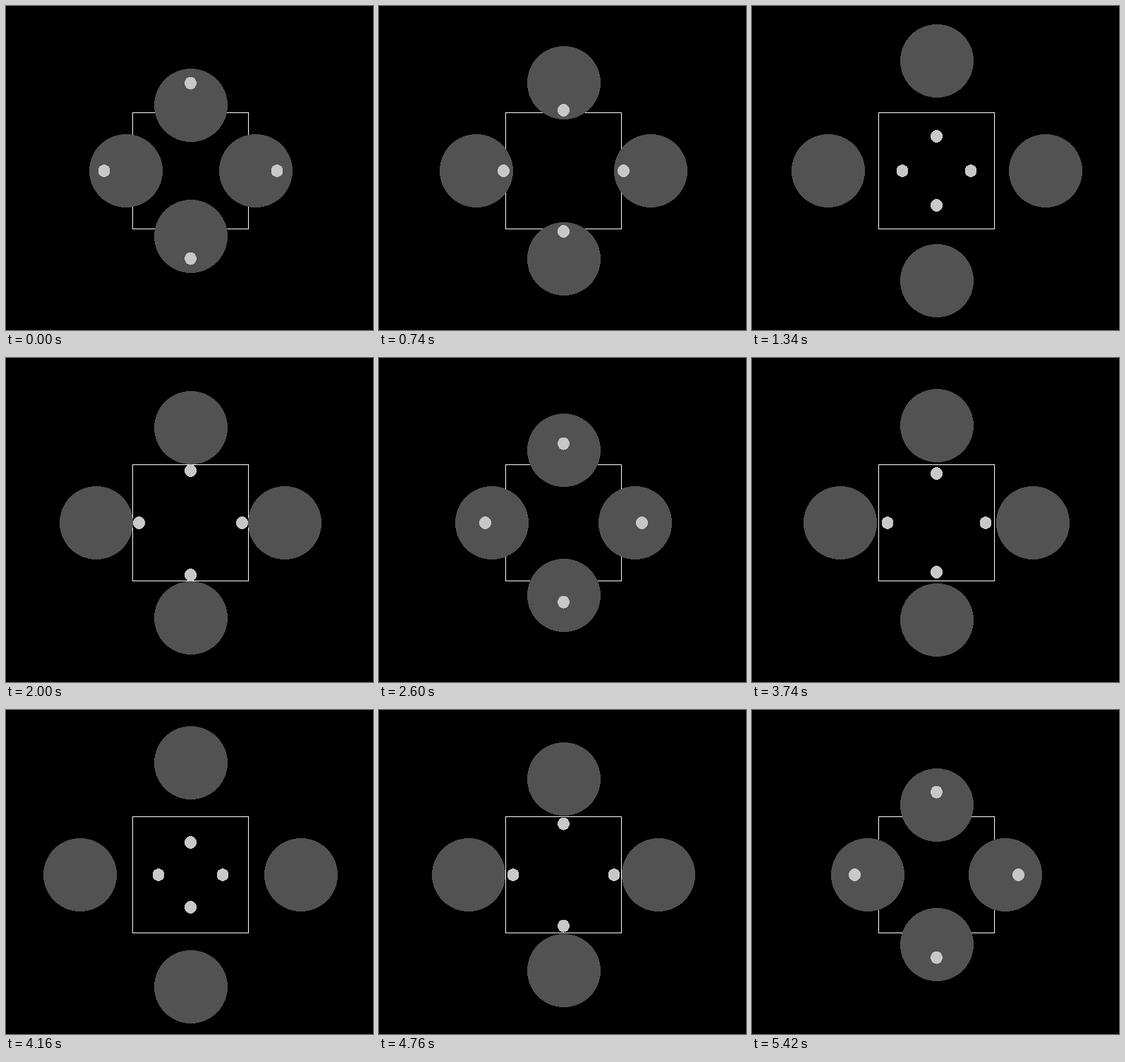
Animation of 520 by 460 pixels, one loop 5480 ms. Source, as an HTML page:

```html
<!DOCTYPE html>
<html>
<head>
<meta charset="utf-8">
<style>
  html, body { margin: 0; height: 100%; overflow: hidden; background: #000; }
  svg { display: block; }
</style>
</head>
<body>
<svg id="stage" width="520" height="460" viewBox="0 0 520 460" shape-rendering="crispEdges">
  <rect x="179.5" y="151.5" width="164" height="165" fill="none" stroke="#fff"/>
</svg>
<script>
const LOOP = 5480, HOLD = 200, STEP = 60;
const CX = 261.5, CY = 234, STRETCH_Y = 1.013;
const DIRECTIONS = [[-1, 0], [1, 0], [0, -1], [0, 1]];

// [step, distance of the discs from the centre], linear in between
const PATH = [[0, 92], [10, 123.5], [20, 154], [22, 159.2], [23, 158], [30, 137],
  [31, 133.5], [44, 92], [50, 109.5], [52, 116.5], [60, 136.5], [67, 156.5],
  [68, 160.2], [69, 158.8], [70, 156], [77, 134.5], [80, 125.5], [88, 97.5]];

const stage = document.getElementById('stage');

function addEllipse(rx, ry, fill) {
  const el = document.createElementNS('http://www.w3.org/2000/svg', 'ellipse');
  for (const [key, value] of Object.entries({ rx, ry, fill })) el.setAttribute(key, value);
  return stage.appendChild(el);
}

const discs = DIRECTIONS.map(() => addEllipse(52, 52, '#525252'));
const dots = DIRECTIONS.map(() => addEllipse(8.5, 9, '#c8c8c8'));

function discDistance(step) {
  const next = PATH.findIndex(([s]) => s > step);
  if (next < 0) return PATH[PATH.length - 1][1];
  const [s0, d0] = PATH[next - 1], [s1, d1] = PATH[next];
  return d0 + (d1 - d0) * (step - s0) / (s1 - s0);
}

function place(shapes, distance, snap) {
  DIRECTIONS.forEach(([dx, dy], i) => {
    shapes[i].setAttribute('cx', snap(CX + dx * distance));
    shapes[i].setAttribute('cy', snap(CY + dy * distance * STRETCH_Y));
  });
}

function draw(now) {
  const t = now % LOOP;
  const step = t < HOLD ? 0 : 1 + Math.floor((t - HOLD) / STEP);
  const distance = discDistance(step);
  place(discs, distance, Math.round);
  // Dots run inwards 1.2 times as fast as the discs run outwards
  place(dots, 122.7 - 1.2 * (distance - 92), v => Math.round(v * 2) / 2);
}

const start = performance.now();
function tick() {
  draw(performance.now() - start);
  requestAnimationFrame(tick);
}
tick();
</script>
</body>
</html>
```
